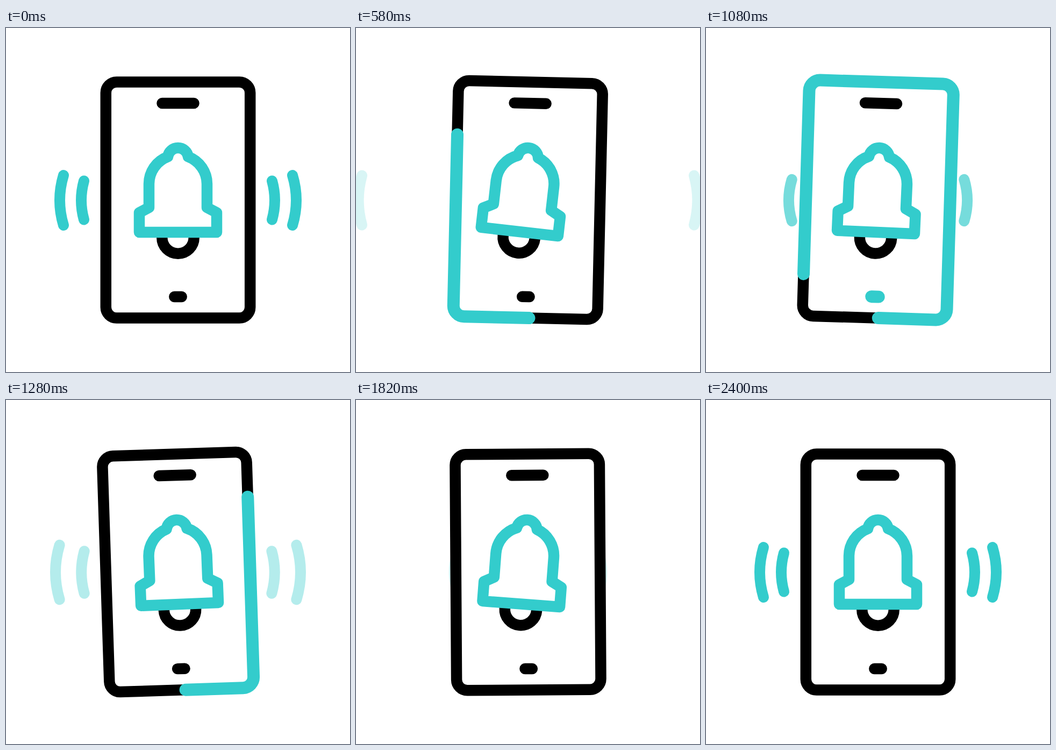
Recreate the animation shown at these times as an HTML page. Size 640 px wide and 640 px high, loop 2.6 s.

```html
<!DOCTYPE html>
<html lang="en">
<head>
<meta charset="utf-8">
<title>Ringing phone</title>
<style>
  html, body { margin: 0; height: 100%; overflow: hidden; background: #fff; }
  svg { display: block; width: 100vw; height: 100vh; }
  path, rect { fill: none; stroke: #000; stroke-width: 20.5; stroke-linecap: round; stroke-linejoin: round; }
  .teal { stroke: #3cc; }
  .glow { stroke: #3cc; stroke-width: 23; }
  .wave { stroke: #3cc; stroke-width: 20; vector-effect: non-scaling-stroke; }
</style>
</head>
<body>
<svg viewBox="0 0 640 640">
  <g id="left">
    <path class="wave outer" d="M3.5-46.5Q-10.5 0 3.5 46.5"/>
    <path class="wave inner" d="M2.5-36Q-7.5 0 2.5 36"/>
  </g>
  <g transform="matrix(-1 0 0 1 640 0)">
    <path class="wave outer" d="M3.5-46.5Q-10.5 0 3.5 46.5"/>
    <path class="wave inner" d="M2.5-36Q-7.5 0 2.5 36"/>
  </g>
  <g id="phone">
    <rect x="185.8" y="100.5" width="268.4" height="439" rx="20" style="fill:#fff"/>
    <path d="M290.5 140H349.5M313.3 500H326.7"/>
    <path id="button" class="glow" d="M313.3 500H326.7"/>
    <path id="trace" class="glow" pathLength="1" d="M327 539.5H205.8A20 20 0 0 1 185.8 519.5V120.5A20 20 0 0 1 205.8 100.5H434.2A20 20 0 0 1 454.2 120.5V519.5A20 20 0 0 1 434.2 539.5H327"/>
    <g id="bell">
      <path d="M290.3 385V390A29.7 29.7 0 0 0 349.7 390V385" style="stroke-linecap:butt"/>
      <path class="teal" d="M266 334V290A54 54 0 0 1 301 239.5A19.2 19.2 0 0 1 339 239.5A54 54 0 0 1 374 290V334L392 343.5V380H248V343.5Z"/>
    </g>
  </g>
</svg>
<script>
const LOOP = 2600, END = 2400;
const $ = id => document.getElementById(id);
const mix = (a, b, k) => a + (b - a) * k;
const smooth = u => u * u * (3 - 2 * u);
const cubic = u => u < .5 ? 4 * u ** 3 : 1 - 4 * (1 - u) ** 3;
const ramp = (t, from, to) => smooth(Math.min(1, Math.max(0, (t - from) / (to - from))));

// Swings between +amp and -amp, starting and ending at rest.
function swing(t, { start, step, count, amp, ease }) {
  const pos = Math.max(0, (t - start) / step), k = Math.floor(pos);
  const key = i => i <= 0 || i >= count ? 0 : i % 2 ? amp : -amp;
  return mix(key(k), key(k + 1), ease(pos - k));
}

const phoneSwing = { start: 15, step: 207, count: 9, amp: 2, ease: smooth };
const bellSwing = { start: 0, step: 197.5, count: 11, amp: 5.15, ease: cubic };

// Horizontal centre of each arc: behind the phone, at rest, and the far ends of two passes.
const arcs = {
  outer: { hidden: 204, rest: 103.5, far: -45.5, near: 37.5 },
  inner: { hidden: 243, rest: 142.5, far: -22.5, near: 89 }
};

function drawWaves(t) {
  for (const [name, p] of Object.entries(arcs)) {
    let x, scale, opacity;
    if (t < 800) {
      const k = ramp(t, 0, 800);
      x = mix(p.rest, p.far, k);
      scale = mix(1, 1.34, k);
      opacity = 1 - k;
    } else if (t < 1600) {
      const k = ramp(t, 800, 1600);
      x = mix(p.hidden, p.near, k);
      scale = mix(.63, 1.34, k);
      opacity = 1 - ramp(t, 710, 1670);
    } else {
      const k = ramp(t, 1600, END);
      x = mix(p.hidden, p.rest, k);
      scale = mix(.63, 1, k);
      opacity = k;
    }
    for (const arc of document.querySelectorAll("." + name)) {
      arc.setAttribute("transform", `translate(${x} 320.5) scale(${scale})`);
      arc.setAttribute("opacity", opacity);
    }
  }
}

function drawTrace(t) {
  const head = ramp(t, 362, 920), tail = ramp(t, 944, 1500);
  const trace = $("trace");
  trace.style.display = head > 0 && tail < 1 ? "" : "none";
  trace.setAttribute("stroke-dasharray", `${head - tail} 2`);
  trace.setAttribute("stroke-dashoffset", -tail);
  const lit = Math.abs(t - 360) < 180 || Math.abs(t - 1080) < 180;
  $("button").style.display = lit ? "" : "none";
}

function draw() {
  const t = Math.min(END, performance.now() % LOOP);
  $("phone").setAttribute("transform", `rotate(${swing(t, phoneSwing)} 320 320)`);
  $("bell").setAttribute("transform", `rotate(${swing(t, bellSwing)} 320 220)`);
  drawWaves(t);
  drawTrace(t);
  requestAnimationFrame(draw);
}
draw();
</script>
</body>
</html>
```
